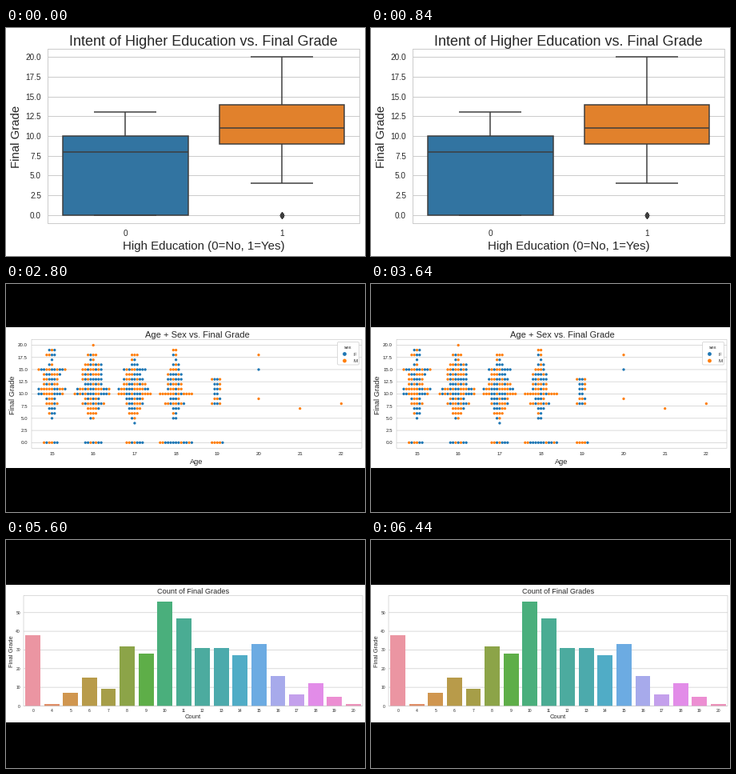
Animation of 449 by 285 pixels, one loop 7 s. Source, as a matplotlib script:

```python
import random

import matplotlib.pyplot as plt
from matplotlib.animation import FuncAnimation
from matplotlib.patches import Circle, FancyBboxPatch, Polygon, Rectangle

W, H, DPI = 449, 285, 100
PT = 72 / DPI  # points per pixel
INK, EDGE, GRID = "#262626", "#3d3d3d", "#cccccc"
BLUE, ORANGE = "#1f77b4", "#ff7f0e"
plt.rcParams["font.family"] = "Liberation Sans"

fig = plt.figure(figsize=(W / DPI, H / DPI), dpi=DPI)
ax = fig.add_axes([0, 0, 1, 1])


def text(x, y, s, size, ha="center"):
    ax.text(x, y, s, fontsize=size * PT, color=INK, ha=ha,
            va="center_baseline", zorder=6)


def vtext(x, y, s, size):
    ax.text(x + 0.36 * size, y, s, fontsize=size * PT, color=INK, ha="center",
            va="baseline", rotation=90, rotation_mode="anchor", zorder=6)


def line(xs, ys, color, lw=1.0, z=3, snap=None):
    ax.plot(xs, ys, color=color, lw=lw * PT, zorder=z, solid_capstyle="butt",
            snap=snap)


def rect(x0, y0, x1, y1, color, z=2, **kw):
    kw.setdefault("lw", 0)
    ax.add_patch(Rectangle((x0, y0), x1 - x0, y1 - y0, fc=color, zorder=z, **kw))


def page(back, top, bottom):
    rect(0, 0, W, H, back, z=0)
    rect(0, top, W, bottom, "white", z=0.1)


def panel(box, yticks, ypos, fmt, right, size, lw=0.7, xgrid=()):
    """Grid, spines and value labels; thin lines are left unsnapped."""
    x0, y0, x1, y1 = box
    snap = lw >= 1
    for v in yticks:
        line([x0, x1], [ypos(v)] * 2, GRID, lw, 1, snap)
        text(right, ypos(v), fmt.format(v), size, "right")
    for x in xgrid:
        line([x, x], [y0, y1], GRID, lw, 1, snap)
    line([x0, x1, x1, x0, x0], [y0, y0, y1, y1, y0], GRID, lw, 2.8, snap)


def box_plot():
    rect(0, 0, W, H, "white", z=0)
    ypos = lambda v: 233.9 - 9.884 * v
    panel((51.75, ypos(21), 442.35, ypos(-1)), [2.5 * i for i in range(9)], ypos,
          "{:.1f}", 44, 10, lw=1)
    stats = [(149.4, "#3274a1", 0, 0, 8, 10, 13),
             (344.7, "#e1812c", 4, 9, 11, 14, 20)]
    half = 78.12
    for i, (x, color, lo, q1, med, q3, hi) in enumerate(stats):
        rect(x - half, ypos(q3), x + half, ypos(q1), color, lw=1.5 * PT, ec=EDGE)
        line([x - half, x + half], [ypos(med)] * 2, EDGE, 1.5)
        for a, b in ((q1, lo), (q3, hi)):
            line([x, x], [ypos(a), ypos(b)], EDGE, 1.5)
            line([x - half / 2, x + half / 2], [ypos(b)] * 2, EDGE, 1.5)
        text(x, 255.5, str(i), 10)
    # many equal outliers lie on top of each other
    ax.plot([344.7] * 30, [ypos(0)] * 30, "d", ms=5 * PT, mec=EDGE, mfc=EDGE,
            mew=PT, zorder=4)
    text(247, 15, "Intent of Higher Education vs. Final Grade", 18)
    text(247, 271, "High Education (0=No, 1=Yes)", 15)
    vtext(12, 135.5, "Final Grade", 15)


def line_plot():
    page("#262626", 53, 231)
    ypos = lambda v: 77.5 + 28.25 * (12 - v)
    xpos = lambda v: 46 + 94.9 * (v - 1)
    xt = [1 + i / 2 for i in range(9)]
    panel((27, 69.3, 445, 205.3), range(8, 13), ypos, "{}", 22, 6.25,
          xgrid=[xpos(v) for v in xt])
    xs = [xpos(v) for v in range(1, 6)]
    top = [81, 76, 86, 119.5, 125]
    low = [199.5, 124.5, 127, 169.5, 198.5]
    band = list(zip(xs, top)) + list(zip(xs, low))[::-1]
    ax.add_patch(Polygon(band, fc=BLUE, ec=BLUE, lw=0.6 * PT, alpha=0.2, zorder=2))
    line(xs, [137.5, 100, 106.5, 144, 161], "#3384bc", 1.1)
    for v in xt:
        text(xpos(v), 212, f"{v:.1f}", 6.25)
    text(235.5, 62.3, "Frequency of Going Out with Friends vs. Final Grade", 11.25)
    text(236, 222.3, "Frequency of Going Out (1=very low, 5=very high)", 9.37)
    vtext(7.6, 138.5, "Final Grade", 9.37)


# students per age, listed from the highest grade downwards, then grade 0
SWARM = {
    15: (range(19, 5, -1), [3, 4, 1, 2, 11, 7, 6, 6, 11, 10, 4, 5, 3, 3], 6),
    16: (range(18, 4, -1), [4, 2, 7, 8, 8, 8, 7, 13, 14, 6, 9, 5, 4, 2], 7),
    17: (range(18, 4, -1), [3, 2, 3, 9, 6, 8, 9, 12, 13, 7, 7, 5, 4, 2], 7),
    18: (range(19, 4, -1), [2, 2, 1, 3, 4, 6, 6, 6, 6, 13, 4, 8, 3, 2, 2], 13),
    19: (range(13, 7, -1), [4, 3, 3, 2, 3, 4], 5),
}
SINGLES = [(15, 5, "F"), (16, 20, "M"), (17, 4, "F"), (20, 18, "M"),
           (20, 15, "F"), (20, 9, "M"), (21, 7, "M"), (22, 8, "M")]
HUE = {"F": BLUE, "M": ORANGE}


def swarm_plot():
    page("black", 54, 230)
    rng = random.Random(4)
    ypos = lambda v: 198.3 - 6.09 * v
    xpos = lambda age: 57.5 + 51.7 * (age - 15)
    panel((32, 69.3, 445, 205.3), [2.5 * i for i in range(9)], ypos, "{:.1f}",
          27, 6.2)
    dot = lambda x, y, c, r=1.65: ax.add_patch(
        Circle((x, y), r, fc=c, lw=0, zorder=5))
    for age, (grades, counts, zeros) in SWARM.items():
        for g, n in [*zip(grades, counts), (0, zeros)]:
            for k in range(n):
                dot(xpos(age) + 3.3 * (k - n // 2), ypos(g), HUE[rng.choice("FM")])
    for age, g, sex in SINGLES:
        dot(xpos(age), ypos(g), HUE[sex])
    for age in range(15, 23):
        text(xpos(age), 212, str(age), 6.2)
    ax.add_patch(FancyBboxPatch((415.5, 73.5), 25, 26.5,
                                boxstyle="round,pad=1,rounding_size=1.5",
                                fc="white", ec=GRID, lw=0.7 * PT, zorder=4))
    text(428, 78.7, "sex", 6.2)
    for y, sex in ((87.5, "F"), (96, "M")):
        dot(423.5, y, HUE[sex], 2.4)
        text(434.5, y, sex, 6.2, "left")
    text(239, 63, "Age + Sex vs. Final Grade", 11.15)
    text(238.5, 221.5, "Age", 9.25)
    vtext(7.6, 138.5, "Final Grade", 9.25)


def bars(x0, step, base, tops, colors, names, y, size):
    for i, (top, color, name) in enumerate(zip(tops, colors, names)):
        x = x0 + step * (i + 0.5)
        rect(x - 0.4 * step, top, x + 0.4 * step, base, color)
        text(x, y, name, size)


def model_plot():
    page("black", 53, 232)
    panel((24, 69.3, 445, 206.3), range(8), lambda v: 206.3 - 19.1 * v, "{}",
          20, 6.3)
    colors = ["#3274a1", "#e1812c", "#3a923a", "#c03d3e", "#9372b2", "#845b53"]
    names = ["Linear Regression", "Random Forest Regression", "SVR",
             "Gaussian Naive Bayes", "Decision Tree Regressor",
             "K-Nearest Neighbors"]
    bars(24, 421 / 6, 206.3, [126.5, 133.5, 124, 77, 115, 126.5], colors, names,
         213, 6.3)
    text(234.5, 62.3, "Model vs. Root-Mean-Squared Error", 11.35)
    text(234, 223.5, "Model", 9.5)
    vtext(7.6, 138.5, "Root-Mean-Squared Error", 9.5)


def count_plot():
    page("black", 56, 228)
    ypos = lambda v: 207.5 - 2.335 * v
    panel((22, 69.5, 446, 207.5), range(0, 51, 10), ypos, "{}", 18, 5)
    counts = [38, 1, 7, 15, 9, 32, 28, 56, 47, 31, 31, 27, 33, 16, 6, 12, 5, 1]
    colors = ["#eb95a2", "#e08f68", "#d0964f", "#b89b4a", "#a69e48", "#8ca448",
              "#5eae48", "#4aaf7c", "#4aac93", "#4cab9f", "#4caaac", "#50acc6",
              "#6cabe2", "#a7aaeb", "#c4a0ec", "#e28ce8", "#ec8ed2", "#ec92ba"]
    grades = [0, *range(4, 21)]
    bars(22, 424 / 18, 207.5, map(ypos, counts), colors, map(str, grades), 212.7, 5)
    text(234.3, 63.5, "Count of Final Grades", 9.1)
    text(234, 220.7, "Count", 7.5)
    vtext(6, 139.5, "Final Grade", 7.5)


SCENES = [box_plot, line_plot, swarm_plot, model_plot, count_plot]


def draw(i):
    ax.clear()
    ax.set_axis_off()
    ax.set_xlim(0, W)
    ax.set_ylim(H, 0)
    SCENES[i]()
    return []


anim = FuncAnimation(fig, draw, frames=len(SCENES), init_func=lambda: draw(0),
                     interval=1400, repeat=True, repeat_delay=0, blit=False)
plt.show()
```
